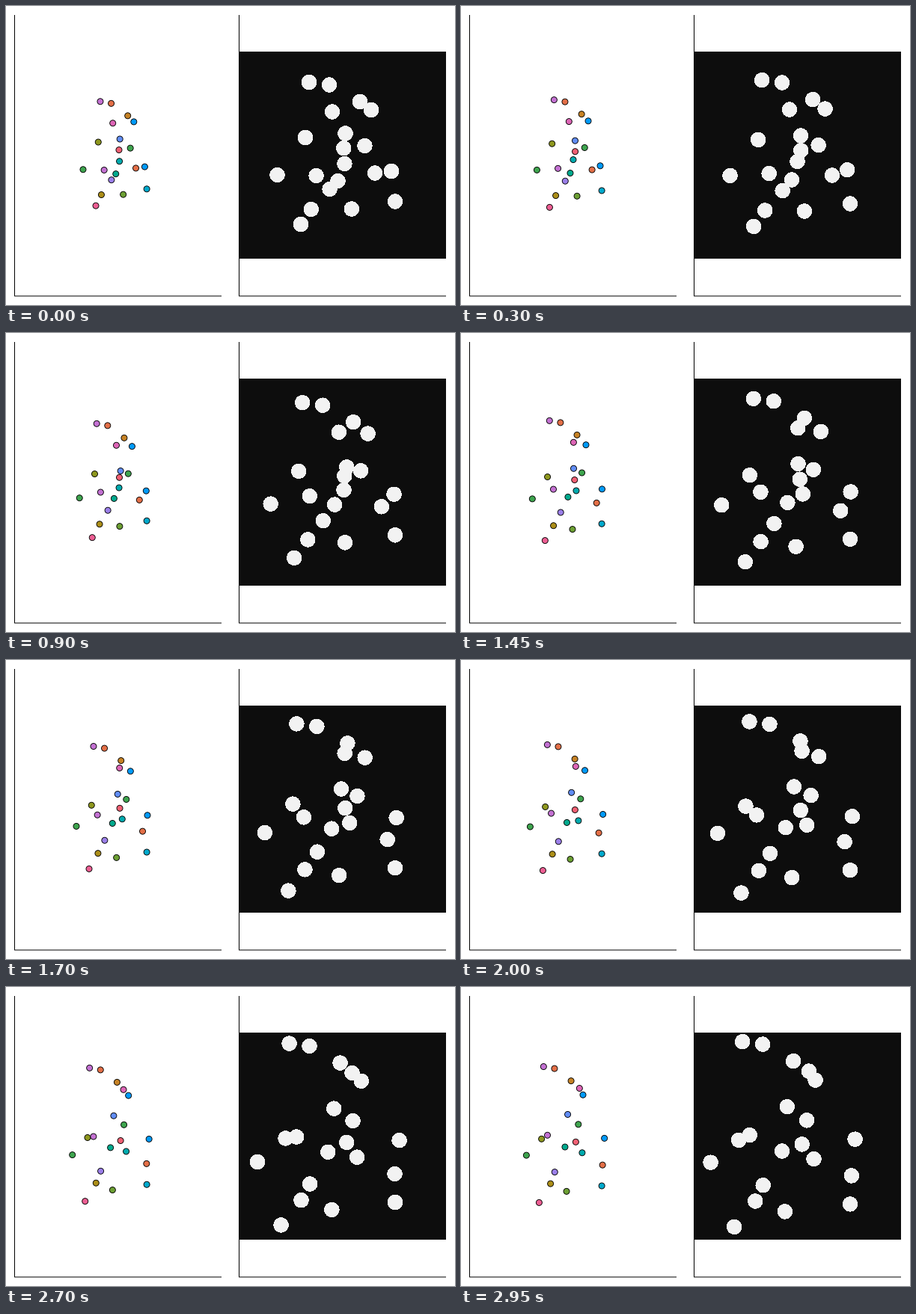
A matplotlib script that plays this animation: 600 by 400 pixels, repeating every 3000 ms.

```python
import itertools

import numpy as np
import matplotlib.pyplot as plt
from matplotlib.animation import FuncAnimation

W, H, DPI = 600, 400, 100
FRAMES, STEP_MS = 60, 50
PX = 72 / DPI  # points per pixel

# Black panel on the right, one cell per pixel
LEFT, RIGHT, TOP, BOTTOM = 312, 588, 61, 338
RADIUS = 10.2
DARK, LIGHT = 13, 242

SPEED = 0.49  # pixels per step along each axis at full speed
REACH = 11.2  # balls closer than this on both axes collide

PALETTE = [
    "#009AFA", "#E36F47", "#3EA44E", "#C371D2", "#AC8E18", "#00AAAE",
    "#ED5E93", "#C68225", "#00A98D", "#8E971E", "#00A9CC", "#9B7FE9",
    "#618DF6", "#F06073", "#DD65B6", "#6C9F33",
]

# Points and headings are complex numbers, with y pointing down
EAST, SOUTH = 1, 1j
WEST, NORTH = -EAST, -SOUTH
NE, NW, SE, SW = NORTH + EAST, NORTH + WEST, SOUTH + EAST, SOUTH + WEST

BALLS = [
    (488 + 139j, NW / 2),
    (432 + 105.5j, NW),
    (479.4 + 187j, 0.6 * WEST + 0.3 * NORTH),
    (405 + 102j, NW),
    (407.7 + 272j, SW / 2),
    (452.4 + 211j, NW),
    (394 + 292j, SW),
    (473 + 128j, NW),
    (443.5 + 234j, NW / 2),
    (400 + 176j, SW),
    (520 + 261.5j, SOUTH),
    (432.6 + 245j, WEST + 0.7 * SOUTH),
    (453.5 + 170.5j, SOUTH + 0.2 * EAST),
    (451.3 + 190.3j, SE),
    (436 + 141.5j, NE),
    (461.8 + 271.5j, SW),
    (515 + 221j, 0.4 * EAST + 0.6 * NORTH),
    (493 + 223.5j, SE),
    (362.5 + 226j, WEST + 0.3 * SOUTH),
    (414.6 + 227j, NW),
]


def collide(pos, vel):
    """Swap the velocities of touching balls that are closing in."""
    for a, b in itertools.combinations(range(len(pos)), 2):
        gap, drift = pos[b] - pos[a], vel[b] - vel[a]
        touching = max(abs(gap.real), abs(gap.imag)) < REACH
        if touching and (gap * drift.conjugate()).real < 0:
            vel[[a, b]] = vel[[b, a]]


def simulate():
    pos = np.array([start for start, _ in BALLS], complex)
    vel = SPEED * np.array([heading for _, heading in BALLS], complex)
    path = []
    for _ in range(FRAMES):
        path.append(pos.copy())
        collide(pos, vel)
        pos += vel
    return path


def to_plot(pos):
    """Map panel positions to the scatter plot on the left."""
    return np.column_stack([(pos.real - 171.9) / 1.8506,
                            199.3 + (pos.imag - 199.5) / 1.3625])


def disc_image(pos):
    xs = np.arange(LEFT, RIGHT) + 0.5
    ys = np.arange(TOP, BOTTOM)[:, None] + 0.5
    grid = xs + 1j * ys
    inside = np.any([abs(grid - p) <= RADIUS for p in pos], axis=0)
    return np.where(inside, LIGHT, DARK).astype(np.uint8)


PATH = simulate()

fig = plt.figure(figsize=(W / DPI, H / DPI), dpi=DPI, facecolor="white")
ax = fig.add_axes([0, 0, 1, 1])
ax.axis("off")

panel = ax.imshow(disc_image(PATH[0]), cmap="gray", vmin=0, vmax=255,
                  extent=(LEFT, RIGHT, BOTTOM, TOP), aspect="auto",
                  interpolation="nearest", zorder=1)
ax.set_xlim(0, W)
ax.set_ylim(H, 0)

for x in (11.5, 311.5):
    ax.plot([x, x, x + 276.5], [12, 388, 388], color="black", lw=PX,
            solid_capstyle="butt", snap=False, zorder=2)

colors = [PALETTE[i % len(PALETTE)] for i in range(len(BALLS))]
dots = ax.scatter(*to_plot(PATH[0]).T, s=(8 * PX) ** 2, c=colors,
                  edgecolors="black", linewidths=0.9 * PX, zorder=3)


def update(k):
    dots.set_offsets(to_plot(PATH[k]))
    panel.set_data(disc_image(PATH[k]))
    return dots, panel


anim = FuncAnimation(fig, update, frames=FRAMES, interval=STEP_MS,
                     repeat=True, repeat_delay=0)
plt.show()
```
